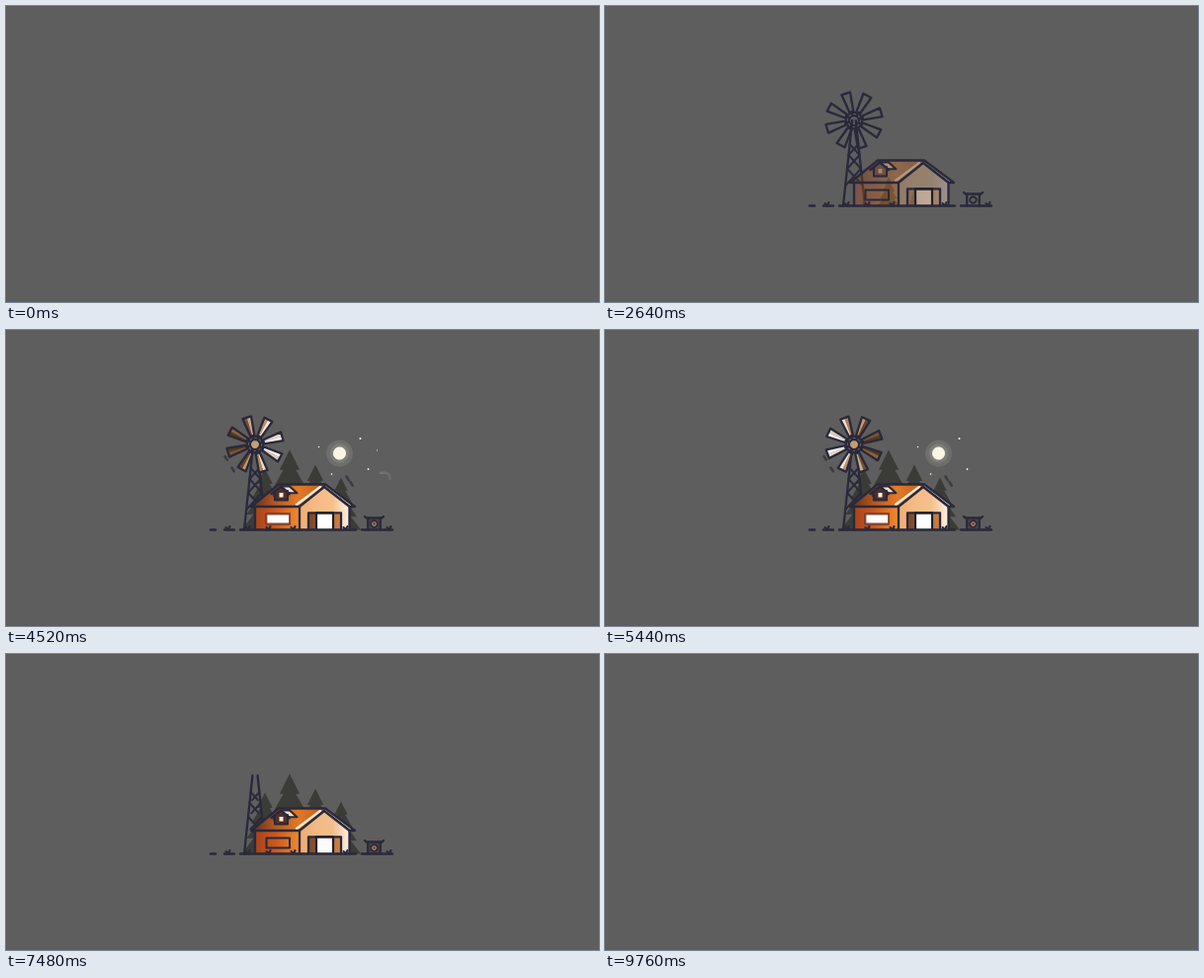
Write an HTML page with a canvas that moves like this. It is 600x300 px and loops after 9960 ms.

```html
<!DOCTYPE html>
<html lang="en">
<head>
<meta charset="utf-8">
<title>Farmhouse at night</title>
<style>
html, body { margin: 0; width: 100%; height: 100%; overflow: hidden; background: #5e5e5e; }
canvas { display: block; width: 600px; height: 300px; }
</style>
</head>
<body>
<canvas id="stage" width="600" height="300"></canvas>
<script>
const ctx = document.getElementById('stage').getContext('2d');
const LOOP = 9960, STEP = 40, TAU = Math.PI * 2;
const INK = '#29293b', LEAF = '#3b3b38';
const BASE = 202.5, EAVE = 179, RIDGE = 156.5;
const LEFT = 252, MIDDLE = 297, RIGHT = 347.5, GABLE = 322;
let now = 0;

const clamp = v => Math.max(0, Math.min(1, v));
const ramp = (start, span) => clamp((now - start) / span);
const smooth = u => u * u * (3 - 2 * u);
const mix = (a, b, u) => a + (b - a) * u;

// Rises for one span after start and falls for one span before end.
const grow = (start, end, span = 450) =>
  (1 - (1 - ramp(start, span)) ** 2) * (1 - ramp(end - span, span) ** 2);

const box = (x, y, w, h) => [[x, y], [x + w, y], [x + w, y + h], [x, y + h]];

function arc(x, y, r, from, to, steps = 16) {
  return Array.from({ length: steps + 1 }, (_, i) => {
    const a = mix(from, to, i / steps);
    return [x + r * Math.cos(a), y + r * Math.sin(a)];
  });
}

function trace(points) {
  ctx.beginPath();
  points.forEach(([x, y]) => ctx.lineTo(x, y));
}

// Strokes the part of a polyline between two fractions of its length.
function line(points, to = 1, width = 2.3, color = INK, from = 0) {
  if (to <= from) return;
  const total = points.slice(1).reduce((sum, [x, y], i) =>
    sum + Math.hypot(x - points[i][0], y - points[i][1]), 0);
  ctx.strokeStyle = color;
  ctx.lineWidth = width;
  ctx.setLineDash([(to - from) * total, total * 2]);
  ctx.lineDashOffset = -from * total;
  trace(points);
  ctx.stroke();
}

function fill(points, color) {
  trace(points);
  ctx.fillStyle = color;
  ctx.fill();
}

const disc = (x, y, r, color) => fill(arc(x, y, r, 0, TAU, 32), color);

function blend(x0, x1, ...colors) {
  const g = ctx.createLinearGradient(x0, 0, x1, 0);
  colors.forEach((c, i) => g.addColorStop(i / (colors.length - 1), c));
  return g;
}

function layer(alpha, draw) {
  if (alpha <= 0) return;
  ctx.save();
  ctx.globalAlpha = alpha;
  draw();
  ctx.restore();
}

function tree(x, height, scale) {
  const tiers = 4, side = [[0, 0]];
  for (let i = 1; i <= tiers; i++) {
    const half = 0.38 * height * (i / tiers) ** 0.8, y = height * i / tiers;
    side.push([half, y], [half * 0.62, y]);
  }
  const at = sign => ([dx, dy]) => [x + sign * dx * scale, BASE + (dy - height) * scale];
  fill([...side.map(at(1)), ...side.map(at(-1)).reverse()], LEAF);
}

function trees() {
  [[287, 81], [313, 66], [262, 62], [339, 53]].forEach(([x, height], i) =>
    tree(x, height, grow(2480 + 60 * i, 8480 - 60 * i, 800)));
}

function sky() {
  const size = grow(3480, 6800, 560);
  disc(337.5, 125, 13.5 * size ** 0.6, 'rgba(190,190,172,.17)');
  disc(337.5, 125, 9.7 * size ** 0.6, 'rgba(205,205,184,.17)');
  disc(337.5, 125, 6.5 * size, '#fdf6e4');

  [[375.5, 122], [316.5, 118.5], [329.5, 146], [366.5, 141], [358.5, 110]].forEach(([x, y], i) => {
    const twinkle = i === 3 ? 0.5 * (1 - ramp(3680, 800)) : 0;
    layer(grow(3360, 5400 + 400 * i, 400), () => disc(x, y, 0.6 + 0.1 * i + twinkle, '#f4f1e6'));
  });

  const wind = [[365, 154.8], ...arc(383.5, 149.8, 5, TAU / 4, -TAU / 4), [379, 144.8]];
  line(wind, ramp(3320, 320), 2.4, blend(364, 389, '#7e7e7e', '#6d6d6d'), ramp(3680, 1280));
}

function marks() {
  layer(grow(3160, 6920), () => {
    [[221.5, 128], [228.5, 139.5], [344.5, 148.5], [348.5, 154]].forEach(([x, y]) =>
      line([[x, y], [x + 2.2, y + 3.6]], 1, 2.6, '#3c3c3f'));
  });
}

function tower() {
  const rise = grow(1320, 7780, 420), brace = grow(1620, 7700);
  const leg = (side, y) => 252 + side * mix(1.8, 11, (y - 116) / (BASE - 116));
  for (const side of [-1, 1]) {
    line([[leg(side, BASE), BASE], [leg(side, 116), 116]], rise);
    for (let top = 140, gap = 11; top < 170; top += gap, gap += 3)
      line([[leg(side, top), top], [leg(-side, top + gap), top + gap]], brace, 1.9);
  }
}

// The wheel is lit from the right.
function wheel() {
  const tint = grow(2640, 6800, 640), blades = 8;
  ctx.save();
  ctx.translate(252, 116);
  ctx.rotate(smooth(ramp(4540, 1820)) * TAU);
  for (let i = 0; i < blades; i++) {
    const angle = (i / blades - 0.047) * TAU;
    ctx.save();
    ctx.rotate(angle);
    layer(tint, () => {
      for (const side of [-1, 1]) {
        const light = 0.5 + 0.36 * Math.cos(angle) - 0.2 * side * Math.sin(angle);
        fill([[9, 0], [28.5, 0], [28.5, 4.5 * side], [9, 2 * side]], `hsl(28 42% ${14 + 92 * light}%)`);
      }
    });
    const outline = grow(1760 + 25 * i, 7240 + 25 * i);
    line([[9, 2], [9, -2], [28.5, -4.5], [28.5, 4.5], [9, 2]], outline);
    line([[5, 0], [9, 0]], outline);
    ctx.restore();
  }
  layer(tint, () => disc(0, 0, 4.5, '#c59d73'));
  const hub = grow(1720, 7400);
  for (const r of [5, 8.2]) line(arc(0, 0, r, 0, TAU), hub, 2);
  ctx.restore();
}

function houseFill() {
  layer(grow(2520, 8000, 600), () => {
    fill([[248, EAVE], [276, RIDGE], [323, RIDGE], [MIDDLE, EAVE]],
      blend(250, 318, '#5f3420', '#b9581f', '#e27a27', '#c8621f'));
    fill(box(LEFT, EAVE, MIDDLE - LEFT, BASE - EAVE), blend(LEFT, MIDDLE, '#a9421a', '#d05c1e', '#f08c30'));
    fill([[MIDDLE, EAVE], [GABLE, 159], [RIGHT, EAVE], [RIGHT, BASE], [MIDDLE, BASE]],
      blend(MIDDLE, RIGHT, '#f0ad73', '#f5bb85', '#f6c08d', '#fff3e6'));
    line([[294, EAVE - 2], [318, 159]], 1, 2.4, '#fff0e0');
    line([[324, 158.5], [350, EAVE - 1]], 1, 2, '#f8ddc3');
    fill(box(306, 185.3, 33, 17), blend(306, 339, '#7a4529', '#cf8246'));
    fill(box(314, 185.3, 17, 17), '#ffffff');
    fill([[269, 166], [278, 159], [287, 166], [285, 172.5], [272, 172.5]], '#4b302c');
    fill([[279, 159], [286, 159], [293, 165], [286, 165]], '#fbe0c8');
    fill(box(276.5, 165, 4, 4.5), '#fff0e0');
  });
}

function houseLines() {
  const shell = grow(640, 9320, 880), door = grow(1360, 8580);
  line([[MIDDLE, EAVE], [248, EAVE], [276, RIDGE], [323, RIDGE], [353, EAVE], [RIGHT, EAVE]], shell);
  line([[LEFT, BASE], [LEFT, EAVE]], shell);
  line([[MIDDLE, BASE], [MIDDLE, EAVE], [GABLE, 159], [RIGHT, EAVE], [RIGHT, BASE]], shell);
  line([[306, BASE], ...box(306, 185.3, 33, 17).slice(0, 3)], door);
  line([[314, BASE], ...box(314, 185.3, 17, 17).slice(0, 3)], door, 2.2, '#20202a');

  const [a, b, c, d] = box(263.5, 186.5, 23.5, 10);
  line([c, d, a, b, c], grow(1620, 8500, 400), 2);

  const dormer = grow(1580, 8620);
  line([[268.5, 166], [278, 158.5], [287, 166]], dormer);
  line([[285, 163], [285, 172.5], [272, 172.5], [272, 164]], dormer, 2);
  line([[285, 165.3], [294.5, 165.3], [287, 158.5], [278, 158.5]], dormer, 2);

  layer(grow(2760, 7460, 400), () => {
    fill([a, b, c, d], '#ffffff');
    line([a, b, c, d, a], 1, 1.8, '#8a4630');
  });
}

function well() {
  const x = 372.5, p = grow(2000, 8480);
  layer(grow(2960, 7800, 320), () => {
    fill(box(x - 6, 191, 12, 11), '#4a4448');
    disc(x, 196.5, 3, '#efb48a');
    disc(x, 196.5, 1.5, '#7c3d30');
  });
  line([[x - 9.5, 189], [x - 8, 190.5], [x + 8, 190.5], [x + 9.5, 189]], p);
  for (const side of [-1, 1]) line([[x + side * 6.3, 191], [x + side * 6.3, BASE]], p);
  line(arc(x, 196.5, 3.2, -TAU / 8, -TAU * 9 / 8), p, 2);
}

function ground() {
  const tip = mix(206, 392, grow(480, 9760, 780));
  [[207, 212], [221, 231], [237, 354], [360, 391]].forEach(([a, b]) => {
    if (tip > a) line([[a, BASE], [Math.min(b, tip), BASE]], 1, 2.4);
  });
  [225, 245, 266, 291, 344, 388].forEach((x, i) => {
    const p = grow(760 + 60 * i, 9440 - 60 * i, 280);
    line([[x - 2.5, 200], [x, BASE], [x + 1.5, 199]], p, 2.1);
  });
}

function render(time) {
  now = Math.floor((time % LOOP) / STEP) * STEP;
  ctx.fillStyle = '#5e5e5e';
  ctx.fillRect(0, 0, 600, 300);
  ctx.lineCap = ctx.lineJoin = 'round';
  [sky, trees, marks, tower, houseFill, houseLines, wheel, well, ground].forEach(draw => draw());
}

const begin = performance.now();
function tick() {
  render(performance.now() - begin);
  requestAnimationFrame(tick);
}
tick();
</script>
</body>
</html>
```
